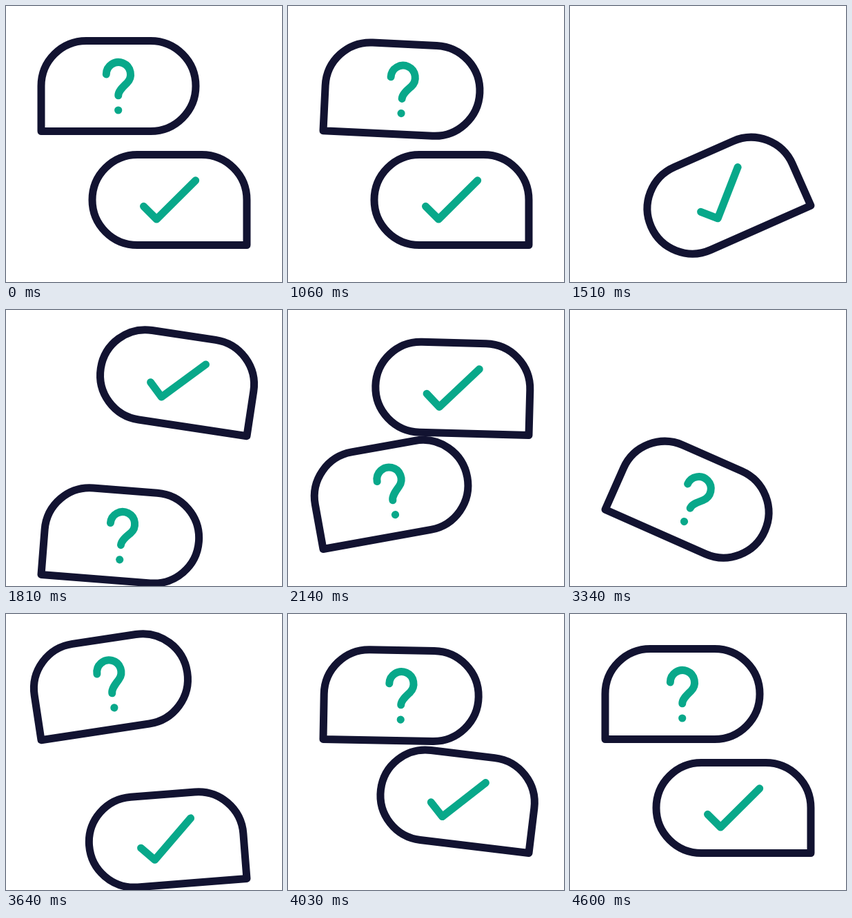
An HTML page that plays this animation: 400x400 px, repeating every 4.63 s.

```html
<!DOCTYPE html>
<html lang="en">
<head>
<meta charset="utf-8">
<title>Question and answer</title>
<style>
  html, body { margin: 0; width: 100%; height: 100%; overflow: hidden; background: #fff; }
  svg { display: block; width: 100%; height: 100%; }
  path { fill: none; stroke-width: 11; stroke-linecap: round; stroke-linejoin: round; }
  .edge { stroke: #121331; }
  .mark { stroke: #08a88a; }
  circle { fill: #08a88a; }
</style>
</head>
<body>
<svg viewBox="0 0 400 400">
  <!-- Each bubble is drawn around its sharp corner, the pivot of its swing. -->
  <g id="ask">
    <path class="edge" d="M0 0V-65.5A65.5 65.5 0 0 1 65.5 -131H158.5A65.5 65.5 0 0 1 158.5 0Z"/>
    <path class="mark" d="M94.3 -82.5a17.6 17.6 0 1 1 30 12.6c-6 5.8 -12.5 11.7 -12.5 18.2"/>
    <circle cx="111.7" cy="-30.5" r="5.6"/>
  </g>
  <g id="answer">
    <path class="edge" d="M0 0V-65.5A65.5 65.5 0 0 0 -65.5 -131H-158.5A65.5 65.5 0 0 0 -158.5 0Z"/>
    <path class="mark" d="M-149.5 -56.2L-130.8 -37.5L-74.3 -93.7"/>
  </g>
</svg>
<script>
const LOOP = 4630, HALF = 1830;
const HIGH = 181.5, LOW = 346.5, ABOVE = -90, BELOW = 588;
const SMOOTH = 'cubic-bezier(.3333, 0, .6667, 1)';
const SNAP = 'cubic-bezier(.3333, 0, .3, 1)';

// Steps are [ms, value, easing to the next step].
const rise = {
  y: [[1296, LOW], [1838, HIGH]],
  turn: [[1240, 0], [1523, -24], [1890, 13], [2257, -2], [2624, 0]]
};
const wrap = {
  y: [[1050, HIGH], [1400, ABOVE], [1403, ABOVE], [1403, BELOW], [1945, LOW]],
  turn: [[1000, 0], [1290, -24], [1673, -24, SNAP], [2040, 13], [2407, -2], [2773, 0]]
};

const shift = steps => steps.map(([ms, v, ease]) => [ms + HALF, v, ease]);

function play(el, prop, first, second, format) {
  const steps = [...first, ...shift(second)];
  const rest = steps[0][1];
  const frames = [[0, rest], ...steps, [LOOP, rest]].map(([ms, v, ease]) => ({
    offset: ms / LOOP,
    [prop]: format(v),
    easing: ease || SMOOTH
  }));
  el.animate(frames, { duration: LOOP, iterations: Infinity });
}

function swing(id, x, side, first, second) {
  const el = document.getElementById(id);
  play(el, 'translate', first.y, second.y, y => `${x}px ${y}px`);
  play(el, 'rotate', first.turn, second.turn, a => `${a * side}deg`);
}

swing('ask', 51, -1, wrap, rise);
swing('answer', 349, 1, rise, wrap);
</script>
</body>
</html>
```
